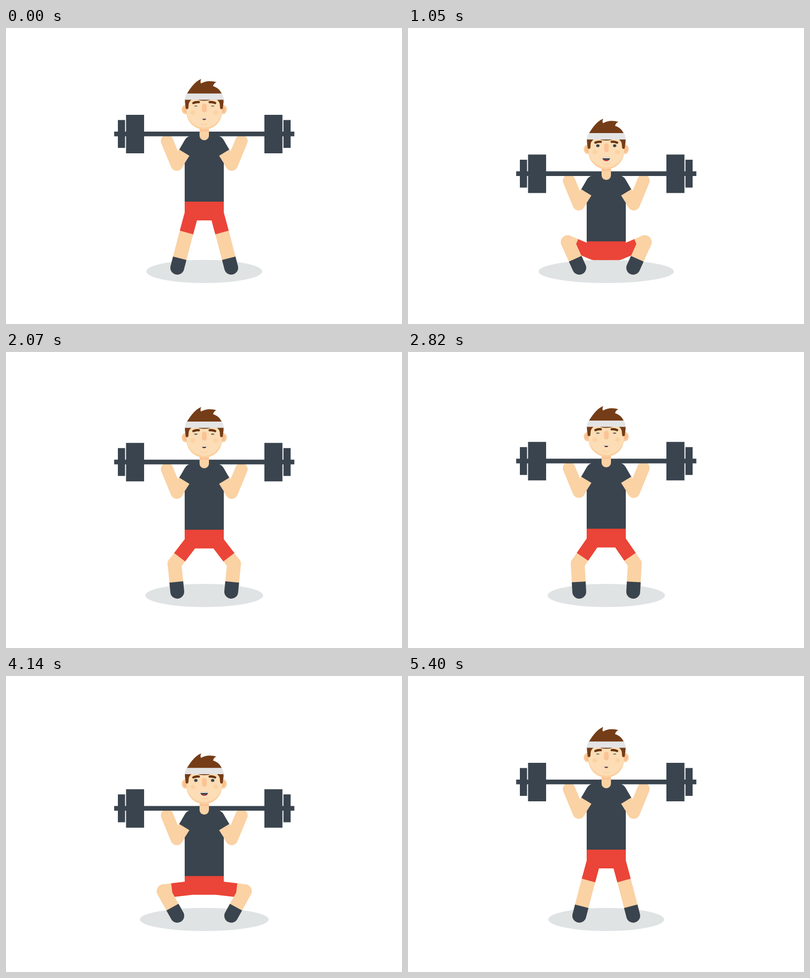
An HTML page that plays this animation: 800x600 px, repeating every 5.43 s.

```html
<!DOCTYPE html>
<html lang="en">
<head>
<meta charset="utf-8">
<title>Barbell squat</title>
<style>
  html, body { margin: 0; height: 100%; overflow: hidden; background: #fff; }
  svg { display: block; width: 800px; height: 600px; }
  .dark { fill: #3a444e; }
  .skin { fill: #fad2a4; }
  .hair { fill: #753d17; }
  .limb { fill: none; stroke: #fad2a4; stroke-linecap: round; stroke-linejoin: round; }
</style>
</head>
<body>
<svg viewBox="0 0 800 600">
  <defs>
    <clipPath id="lips"><path d="M-8 0H8C8 4 4.500 7.500 0 7.500S-8 4-8 0z"/></clipPath>
  </defs>

  <ellipse id="shadow" cx="400.500" cy="493.500" ry="23.500" fill="#dfe3e4"/>

  <path id="thigh" class="limb" stroke-width="28"/>
  <use href="#thigh" transform="translate(801) scale(-1 1)"/>
  <path id="shorts" fill="none" stroke="#eb4438" stroke-width="28" stroke-linejoin="round"/>
  <g id="calf">
    <path class="limb" stroke-width="28" d="M0 0V-56.880"/>
    <path class="dark" d="M-14-20H14V0A14 14 0 0 1-14 0z"/>
  </g>
  <use href="#calf" transform="translate(801) scale(-1 1)"/>

  <g id="body">
    <path fill="#eb4438" d="M361 350H440V376H361z"/>

    <g id="side">
      <path class="limb" stroke-width="25" d="M362 250L345 277L325.300 229"/>
      <path class="dark" d="M226 186.500H240.500V243H226zM242.500 176H279V254H242.500zM218.500 210H401V219.500H218.500z"/>
      <path class="dark" d="M401 218H375Q366 219 361.500 226.500L350 246.500L370.500 259L361 274V352H401z"/>
    </g>
    <use href="#side" transform="translate(801) scale(-1 1)"/>

    <path class="skin" d="M391 196H410V218A9.500 9.500 0 0 1 391 218z"/>
    <path fill="#fbc396" d="M391 200H410V210H391z"/>

    <g id="ear">
      <ellipse cx="363" cy="165.300" rx="8" ry="9.500" fill="#fbcb9b"/>
      <ellipse cx="363" cy="165.300" rx="4.500" ry="6" fill="#fabd8c"/>
    </g>
    <use href="#ear" transform="translate(801) scale(-1 1)"/>

    <path fill="#fbd0a0" d="M364.500 140H436.500V170A36 36 0 0 1 364.500 170z"/>
    <path fill="#fcddb5" d="M364.500 140H436.500V166A36 36 0 0 1 364.500 166z"/>
    <path fill="none" stroke="#fbd3a5" stroke-width="2" stroke-linecap="round" d="M394 194Q400.500 198.500 407 194"/>
    <rect x="396" y="153.500" width="9.500" height="17.500" rx="4.500" fill="#fbc396"/>

    <g id="cheek">
      <ellipse cx="377.500" cy="171.300" rx="5" ry="4.300" fill="#fdd2a2"/>
      <path class="hair" d="M361.500 144H376.500Q369.500 149 369 155L368.500 162Q368 164.500 365.500 164.500T362.800 161L361.500 150z"/>
      <path fill="none" stroke="#693513" stroke-width="4.600" stroke-linecap="round" d="M378.500 152Q384 149.500 389.500 150.300"/>
      <ellipse class="eye dark" cx="383.500" cy="158.200" rx="3.400"/>
    </g>
    <use href="#cheek" transform="translate(801) scale(-1 1)"/>

    <path class="hair" d="M386 144H415Q411 147.500 400.500 147.500T386 144z"/>
    <path class="hair" d="M365 134C371 125 379 110 394.500 103.300C392.500 107 392.500 110 394 112.500C402 107 415 106.500 425 109.800C420.500 112 419 114.500 418.500 118C427 120.500 433 126 436 134z"/>
    <path fill="#e4e4e5" d="M365.500 132.700H435.500Q439.500 138 440 145.500H361.300Q361.500 138 365.500 132.700z"/>

    <g id="mouth" clip-path="url(#lips)">
      <path class="dark" d="M-8 0H8V8H-8z"/>
      <path fill="#fff" d="M-8 0H8V1.700H-8z"/>
      <ellipse cy="7.500" rx="5" ry="2.700" fill="#dc3442"/>
    </g>
  </g>
</svg>
<script>
const $ = id => document.getElementById(id);
const LOOP = 5430, REP = 2700, DOWN = 720, DEPTH = 85, STEP = 30;
const BONE = 56.88, CUFF = 17, foot = { x: 346, y: 486 };
const smooth = p => p * p * (3 - 2 * p);

// Ease with control points (x1, 0) and (x2, 1), solved by bisection.
function ease(u, x1, x2) {
  let lo = 0, hi = 1;
  for (let i = 0; i < 24; i++) {
    const p = (lo + hi) / 2, q = 1 - p;
    if (3 * p * q * q * x1 + 3 * p * p * q * x2 + p * p * p < u) lo = p;
    else hi = p;
  }
  return smooth(lo);
}

function squat(t) {
  return DEPTH * (t < DOWN
    ? smooth(t / DOWN)
    : 1 - ease((t - DOWN) / (REP - DOWN), 0.476, 0.3));
}

// Two equal bones from hip to foot, knee bent outwards.
function findKnee(hip) {
  const dx = foot.x - hip.x, dy = foot.y - hip.y, d = Math.hypot(dx, dy);
  const bend = Math.sqrt(Math.max(0, BONE * BONE - d * d / 4)) / d;
  return { x: hip.x + dx / 2 - dy * bend, y: hip.y + dy / 2 + dx * bend };
}

function draw(t) {
  const off = squat(t % REP);
  const hip = { x: 375, y: 376 + off }, knee = findKnee(hip);
  const k = 1 - CUFF / BONE;
  const cuff = { x: hip.x + (knee.x - hip.x) * k, y: hip.y + (knee.y - hip.y) * k };
  const angle = Math.atan2(knee.x - foot.x, foot.y - knee.y) * 180 / Math.PI;
  const open = smooth(Math.min(1, off / 50));

  $('shadow').setAttribute('rx', 117 + off * 0.247);
  $('body').setAttribute('transform', `translate(0 ${off})`);
  $('thigh').setAttribute('d', `M${hip.x} ${hip.y}L${knee.x} ${knee.y}`);
  $('shorts').setAttribute('d',
    `M${cuff.x} ${cuff.y}L${hip.x} ${hip.y}H${801 - hip.x}L${801 - cuff.x} ${cuff.y}`);
  $('calf').setAttribute('transform', `translate(${foot.x} ${foot.y}) rotate(${angle})`);
  $('mouth').setAttribute('transform',
    `translate(400.5 ${182.8 - open}) scale(${0.52 + 0.48 * open})`);
  document.querySelector('.eye').setAttribute('ry', 0.8 + 2.1 * open);
}

const start = performance.now();
function tick() {
  const t = (performance.now() - start) % LOOP;
  draw(Math.floor(t / STEP) * STEP);
  requestAnimationFrame(tick);
}
tick();
</script>
</body>
</html>
```
